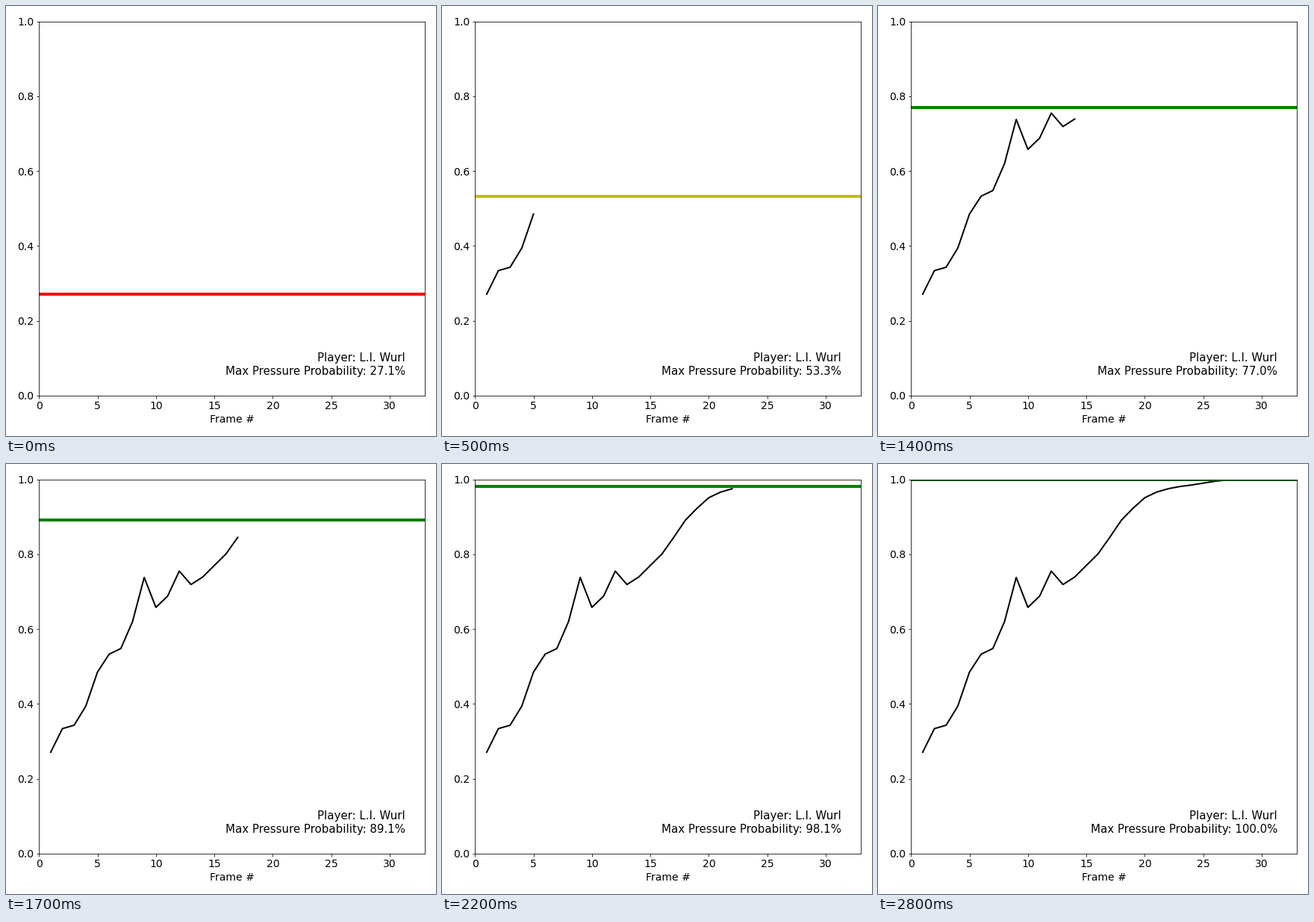
Recreate the animation shown at these times as a matplotlib script. Size 576 by 576 pixels, loop 3400 ms.

```python
import matplotlib.pyplot as plt
import numpy as np
from matplotlib.animation import FuncAnimation

FRAMES = 34
INTERVAL = 100
PLAYER = "L.I. Wurl"

plt.rcParams.update({"font.family": "DejaVu Sans", "font.size": 14})

pressure = np.array([
    0.271, 0.334, 0.343, 0.394, 0.485, 0.533, 0.548, 0.620, 0.738, 0.658,
    0.688, 0.755, 0.719, 0.739, 0.770, 0.801, 0.845, 0.891, 0.923, 0.951,
    0.966, 0.975, 0.981, 0.985, 0.990, 0.995, 0.998, 0.999, 0.9997,
])
steps = np.arange(1, len(pressure) + 1)
peaks = np.maximum.accumulate(pressure)


def level_color(p):
    if p < 0.5:
        return "r"
    return "y" if p < 0.7 else "g"


fig, ax = plt.subplots(figsize=(8, 8), dpi=72)
ax.set_xlim(0, 33)
ax.set_ylim(0, 1)
ax.set_xlabel("Frame #")
curve, = ax.plot([], [], color="k", lw=2)
peak_line = ax.axhline(peaks[0], color="r", lw=4)
label = ax.text(0.95, 0.05, "", transform=ax.transAxes, fontsize=15,
                ha="right", va="bottom")
fig.tight_layout()


def update(i):
    # The peak level runs one sample ahead of the drawn curve.
    peak = peaks[min(i, len(peaks) - 1)]
    curve.set_data(steps[:i], pressure[:i])
    peak_line.set_ydata([peak, peak])
    peak_line.set_color(level_color(peak))
    label.set_text(f"Player: {PLAYER}\nMax Pressure Probability: {peak:.1%}")
    return curve, peak_line, label


anim = FuncAnimation(fig, update, frames=FRAMES, interval=INTERVAL,
                     init_func=lambda: update(0), repeat=True, repeat_delay=0)
plt.show()
```
